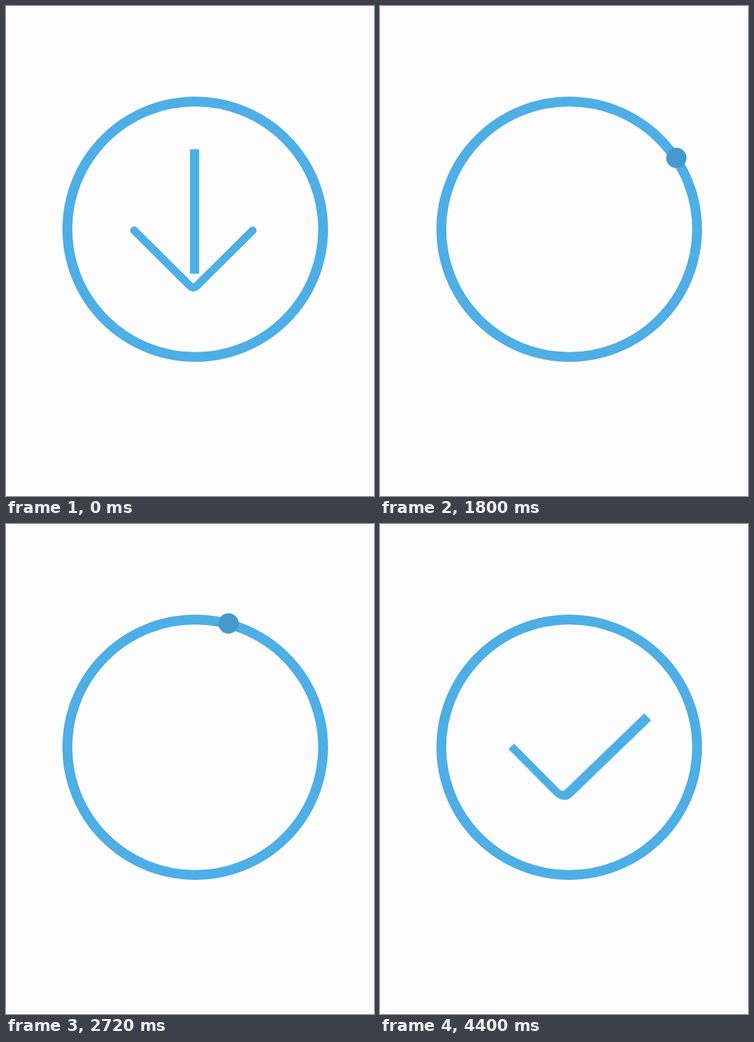
These frames come from a looping animation (600 by 800 pixels, 4960 ms). An HTML page:

```html
<!DOCTYPE html>
<html lang="en">
<head>
<meta charset="utf-8">
<title>Download icon</title>
<style>
  html, body { margin: 0; height: 100%; overflow: hidden; background: #fcfcfc; }
  svg { display: block; width: 600px; height: 800px; }

  /* 4960 ms at 25 steps per second */
  svg * { animation: 4960ms linear infinite; }

  .line { fill: none; stroke: #4eaee6; }
  .bar { fill: #4eaee6; }

  .head { stroke-width: 13; stroke-linecap: round; stroke-dasharray: 1 2; animation-name: retract, head-show; }
  .rise { animation-name: rise; }
  .leave { animation-name: leave; }
  .dot { fill: #4599cb; transform-origin: 310px 364px; animation-name: spin, dot-show; }
  .tick { stroke-width: 1; animation-name: tick, tick-show; }

  .head, .dot, .tick { animation-timing-function: linear, step-end; }

  @keyframes retract {
    0% { stroke-dashoffset: 0; animation-timing-function: steps(23); }
    18.548%, 100% { stroke-dashoffset: 1.025; }
  }
  @keyframes head-show {
    0% { opacity: 1; }
    18.548%, 100% { opacity: 0; }
  }

  @keyframes rise {
    0%, 17.7419% { transform: translateY(0); animation-timing-function: steps(11); }
    26.6129%, 100% { transform: translateY(-75px); }
  }
  @keyframes leave {
    0%, 26.6129% { transform: translateY(0); animation-timing-function: steps(8); }
    33.0645%, 100% { transform: translateY(-275px); }
  }

  @keyframes spin {
    0%, 33.0645% { transform: rotate(.8deg); animation-timing-function: steps(47); }
    70.9677%, 100% { transform: rotate(651.57deg); }
  }
  @keyframes dot-show {
    0% { opacity: 0; }
    33.0645% { opacity: 1; }
    70.9677%, 100% { opacity: 0; }
  }

  @keyframes tick {
    0%, 73.387% { stroke-dasharray: 5.25 99; stroke-dashoffset: 0; animation-timing-function: steps(14); }
    84.6774% { stroke-dasharray: 24.23 99; stroke-dashoffset: -11.97; animation-timing-function: steps(3); }
    87.0967% { stroke-dasharray: 22.03 99; stroke-dashoffset: -6.9; animation-timing-function: steps(2); }
    88.7096%, 100% { stroke-dasharray: 22.03 99; stroke-dashoffset: -8.19; }
  }
  @keyframes tick-show {
    0% { opacity: 0; }
    70.9677%, 100% { opacity: 1; }
  }
</style>
</head>
<body>
<svg viewBox="0 0 600 800">
  <clipPath id="disc"><circle cx="308.5" cy="364.5" r="210"/></clipPath>

  <g clip-path="url(#disc)">
    <g class="leave">
      <path class="bar" d="M300 234.3h5.8l1.5-1.3 1.5 1.3h6V436.7h-6l-1.5 1.3-1.5-1.3H300z"/>
      <path class="bar rise" d="M300 234.3h5.8l1.5-1.3 1.5 1.3h6V436.7h-6l-1.5 1.3-1.5-1.3H300z"/>
    </g>
  </g>

  <path class="line head" pathLength="1" d="M305.5 459.5Q302.5 459.5 299.5 456.5L209 366.5"/>
  <path class="line head" pathLength="1" d="M305.5 459.5Q308.5 459.5 311.5 456.5L402 366.5"/>

  <!-- skewed axes give the two arms their different weights -->
  <g transform="matrix(11.4 11.5 9.2 -8.89 298.5 448.2)">
    <path class="line tick" d="M-15.6 0H-1Q0 0 0 1V21"/>
  </g>

  <circle class="line" cx="308.5" cy="364.5" r="208.5" stroke-width="16"/>
  <circle class="dot" cx="310" cy="155.6" r="16.6"/>
</svg>
</body>
</html>
```
